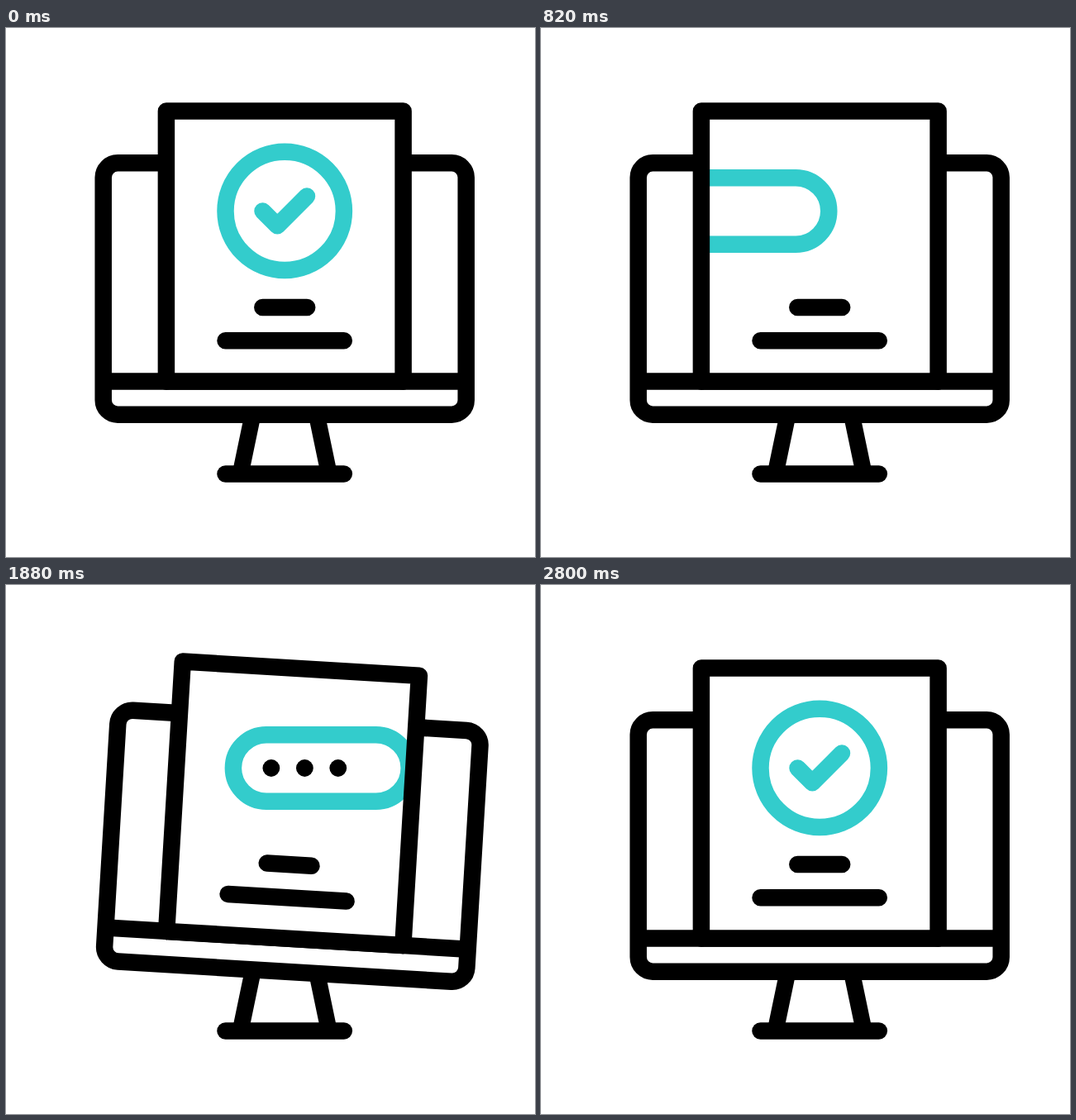
Recreate the animation shown at these times as an HTML page. Size 640x640 px, loop 3 s.

```html
<!DOCTYPE html>
<html lang="en">
<head>
<meta charset="utf-8">
<title>Verified on screen</title>
<style>
  html, body { margin: 0; width: 100%; height: 100%; overflow: hidden; background: #fff; }
  svg { display: block; width: 100%; height: 100%; }
  .line { fill: none; stroke: #000; stroke-width: 20.5; stroke-linecap: round; stroke-linejoin: round; }
  .accent { stroke: #3cc; }
</style>
</head>
<body>
<svg viewBox="0 0 640 640">
  <defs>
    <clipPath id="page"><rect id="pageArea" x="194" y="100" width="287" height="327"/></clipPath>
  </defs>

  <g class="line">
    <path d="M298.5 468L283.7 539M375.9 468L390.7 539" stroke-width="20" stroke-linecap="butt"/>
    <path d="M265.5 539.4H408.8"/>
  </g>

  <g id="monitor" class="line">
    <rect x="117.7" y="163.3" width="439" height="304.4" rx="17.5"/>
    <path d="M118 427.5H556.5" stroke-linecap="butt"/>
  </g>

  <g id="sheet">
    <path d="M193.9 427.5V100.5H480.6V427.5" fill="#fff"/>
    <path class="line" d="M193.9 427.5H480.6" stroke-linecap="butt"/>
    <path class="line" d="M310.3 338H364.2M265.5 378.2H408.8"/>
  </g>

  <g clip-path="url(#page)">
    <g id="badge" class="line accent">
      <circle cx="337.2" cy="221.4" r="71.7"/>
      <path id="tick" pathLength="100" d="M310.5 221.5L328.3 239.3L364 203.5"/>
    </g>
    <g id="field">
      <rect class="line accent" x="230.5" y="181.3" width="212.8" height="80.4" rx="40.2"/>
      <circle class="dot" cx="276.5" cy="221.5" r="10.4"/>
      <circle class="dot" cx="317" cy="221.5" r="10.4"/>
      <circle class="dot" cx="357.4" cy="221.5" r="10.4"/>
    </g>
  </g>

  <path id="frame" class="line" d="M193.9 427.5V100.5H480.6V427.5"/>
</svg>

<script>
  const LOOP = 3000, STEP = 20;
  const FIRST = 200, SECOND = 1700;      // start of each swap
  const SLIDE = 700, ENTER_DELAY = 200;
  const TILT = 4.4, HALF_TILT = 258;
  const BADGE_TRAVEL = 239, FIELD_TRAVEL = 270;
  const DOT_TIMES = [1100, 1320, 1520];

  const $ = id => document.getElementById(id);
  const dots = document.querySelectorAll('.dot');

  // Eased progress from 0 to 1
  function ease(t, start, length) {
    const p = Math.min(1, Math.max(0, (t - start) / length));
    return p * p * (3 - 2 * p);
  }

  const swing = (t, start) =>
    TILT * (ease(t, start, HALF_TILT) - ease(t, start + HALF_TILT, HALF_TILT));

  const leave = (t, start, travel) => travel * ease(t, start, SLIDE);
  const enter = (t, start, travel) => travel * (ease(t, start + ENTER_DELAY, SLIDE) - 1);

  function rotate(id, angle, y) {
    $(id).setAttribute('transform', `rotate(${angle} 337.2 ${y})`);
  }

  function place(id, x) {
    $(id).setAttribute('transform', `translate(${x} 0)`);
  }

  function draw(t) {
    const angle = swing(t, FIRST) + swing(t, SECOND);
    rotate('monitor', angle, 467.7);
    for (const id of ['sheet', 'frame', 'pageArea']) rotate(id, angle, 427.5);

    const second = t >= SECOND;
    place('badge', second ? enter(t, SECOND, BADGE_TRAVEL) : leave(t, FIRST, BADGE_TRAVEL));
    place('field', second ? leave(t, SECOND, FIELD_TRAVEL) : enter(t, FIRST, FIELD_TRAVEL));

    const drawn = second ? ease(t, 2400, 400) : 1;
    $('tick').style.visibility = drawn > 0 ? 'visible' : 'hidden';
    $('tick').setAttribute('stroke-dasharray', drawn < 1 ? `${drawn * 100} 200` : 'none');

    dots.forEach((dot, i) => {
      dot.style.visibility = t >= DOT_TIMES[i] ? 'visible' : 'hidden';
    });
  }

  const began = performance.now();
  function tick() {
    const t = (performance.now() - began) % LOOP;
    draw(Math.floor(t / STEP) * STEP);
    requestAnimationFrame(tick);
  }
  tick();
</script>
</body>
</html>
```
